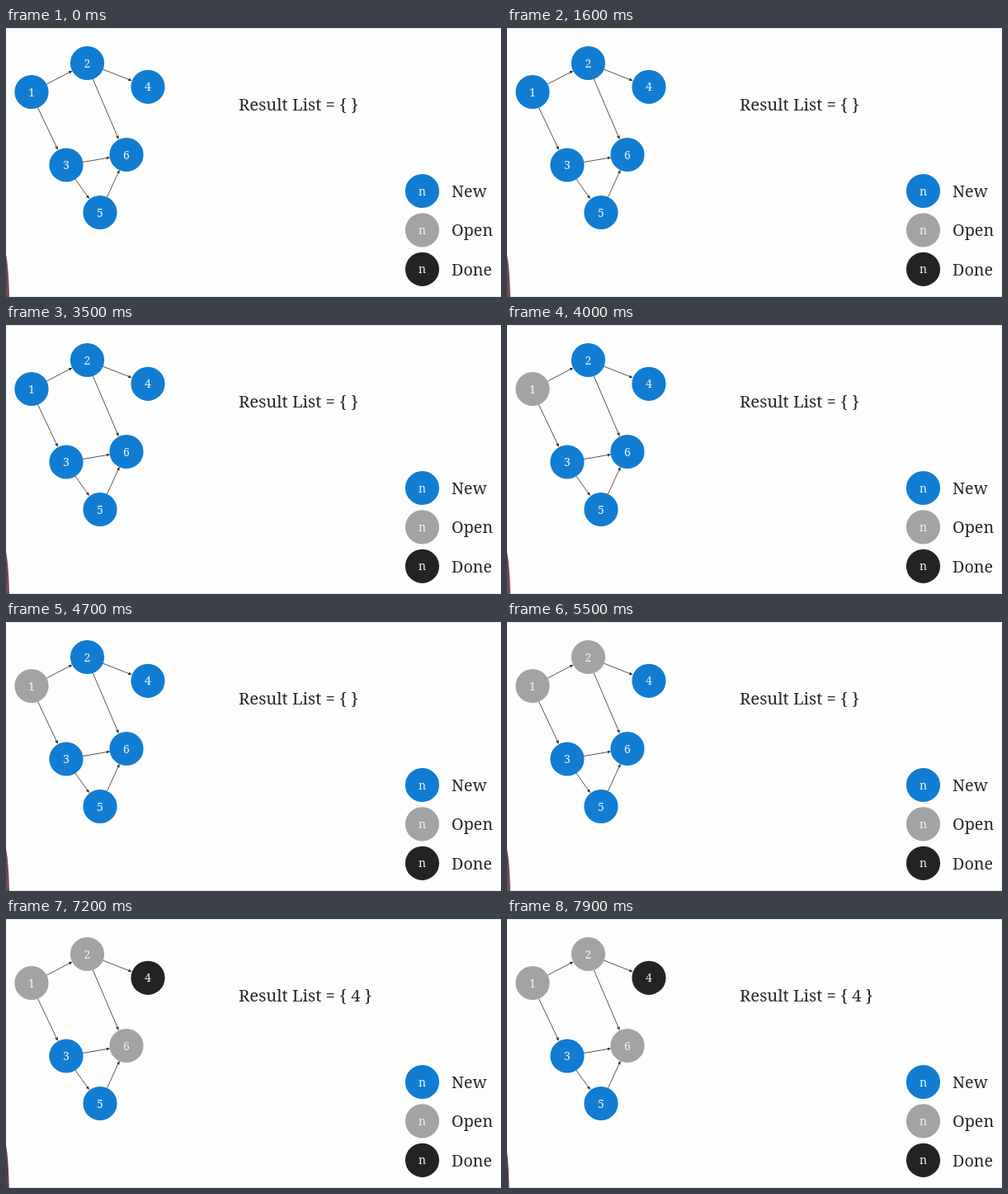
Recreate the animation shown at these times as an HTML page. Size 600 px wide and 326 px high, loop 8 s.

```html
<!DOCTYPE html>
<html lang="en">
<head>
<meta charset="utf-8">
<title>Depth-first traversal</title>
<style>
  html, body { margin: 0; width: 100%; height: 100%; overflow: hidden; background: #fdfdfd; }
  svg { display: block; width: 600px; height: 326px; }
  text { font-family: "Noto Serif", serif; font-size: 19.8px; fill: #262626; }
  #result { font-size: 20.3px; }
  .label { font-size: 14px; fill: #f4f4f4; text-anchor: middle; }
  .edge { stroke: #555; stroke-width: 1; marker-end: url(#arrow); }
</style>
</head>
<body>
<svg id="stage" viewBox="0 0 600 326">
  <defs>
    <marker id="arrow" markerUnits="userSpaceOnUse" markerWidth="5" markerHeight="4" refX="4" refY="2" orient="auto">
      <path d="M0 0L4 2L0 4Z" fill="#333"/>
    </marker>
  </defs>
  <path d="M0 0.5H600M0 325.5H600" stroke="#ececec"/>
  <path id="sleeve"/>
  <text id="result" x="282" y="100"></text>
</svg>
<script>
const LOOP = 8000;
const RADIUS = 20.6;
const COLORS = { new: '#117dd2', open: '#a3a3a3', done: '#232323' };
const stage = document.getElementById('stage');
const sleeve = document.getElementById('sleeve');
const result = document.getElementById('result');

const graph = {
  1: { x: 31, y: 77.5, next: [2, 3] },
  2: { x: 98.5, y: 42.5, next: [4, 6] },
  3: { x: 73, y: 166, next: [5, 6] },
  4: { x: 172, y: 71.3, next: [] },
  5: { x: 114, y: 223.5, next: [6] },
  6: { x: 146, y: 153.5, next: [] }
};
const visits = [
  { at: 3800, id: 1, state: 'open' },
  { at: 4800, id: 2, state: 'open' },
  { at: 5700, id: 4, state: 'open' },
  { at: 6200, id: 4, state: 'done' },
  { at: 7200, id: 6, state: 'open' }
];

function add(tag, attributes, content = '') {
  const element = document.createElementNS('http://www.w3.org/2000/svg', tag);
  for (const key in attributes) element.setAttribute(key, attributes[key]);
  element.textContent = content;
  return stage.appendChild(element);
}

function addNode(x, y, label, state) {
  const circle = add('circle', { cx: x, cy: y, r: RADIUS, fill: COLORS[state] });
  add('text', { x, y: y + 5, class: 'label' }, label);
  return circle;
}

// Runs from rim to rim; descending edges lean slightly left of the centres.
function addEdge(from, to) {
  const dx = to.x - from.x, dy = to.y - from.y, length = Math.hypot(dx, dy);
  const ux = dx / length, uy = dy / length, lean = 1.6 * Math.max(0, uy);
  add('line', {
    x1: from.x + ux * RADIUS - lean, y1: from.y + uy * RADIUS,
    x2: to.x - ux * RADIUS - lean, y2: to.y - uy * RADIUS,
    class: 'edge'
  });
}

const nodes = Object.values(graph);
nodes.forEach(node => node.next.forEach(id => addEdge(node, graph[id])));
Object.entries(graph).forEach(([id, node]) => {
  node.circle = addNode(node.x, node.y, id, 'new');
});
['New', 'Open', 'Done'].forEach((name, i) => {
  const y = 197.5 + i * 47.4;
  addNode(504.5, y, 'n', name.toLowerCase());
  add('text', { x: 540, y: y + 7.5 }, name);
});

const mix = (from, to, share) => from + (to - from) * share;

function drawSleeve(time) {
  const share = Math.min(1, Math.max(0, (time - 5500) / 2400));
  const top = mix(275, 282, share) - 7 * Math.sin(Math.PI * share);
  const width = mix(4, 2.5, share) + Math.sin(Math.PI * share);
  sleeve.setAttribute('d', `M0 ${top}Q${width * 0.8} ${top + 15} ${width} 326H0Z`);
  sleeve.setAttribute('fill', `hsl(339 24% ${mix(37, 28, share)}%)`);
}

function draw(time) {
  nodes.forEach(node => node.state = 'new');
  for (const { at, id, state } of visits) if (time >= at) graph[id].state = state;
  nodes.forEach(node => node.circle.setAttribute('fill', COLORS[node.state]));

  const done = Object.keys(graph).filter(id => graph[id].state === 'done');
  result.textContent = `Result List = {${done.map(id => ' ' + id).join(',')} }`;
  drawSleeve(time);
}

const begin = performance.now();
function tick() {
  draw((performance.now() - begin) % LOOP);
  requestAnimationFrame(tick);
}
tick();
</script>
</body>
</html>
```
